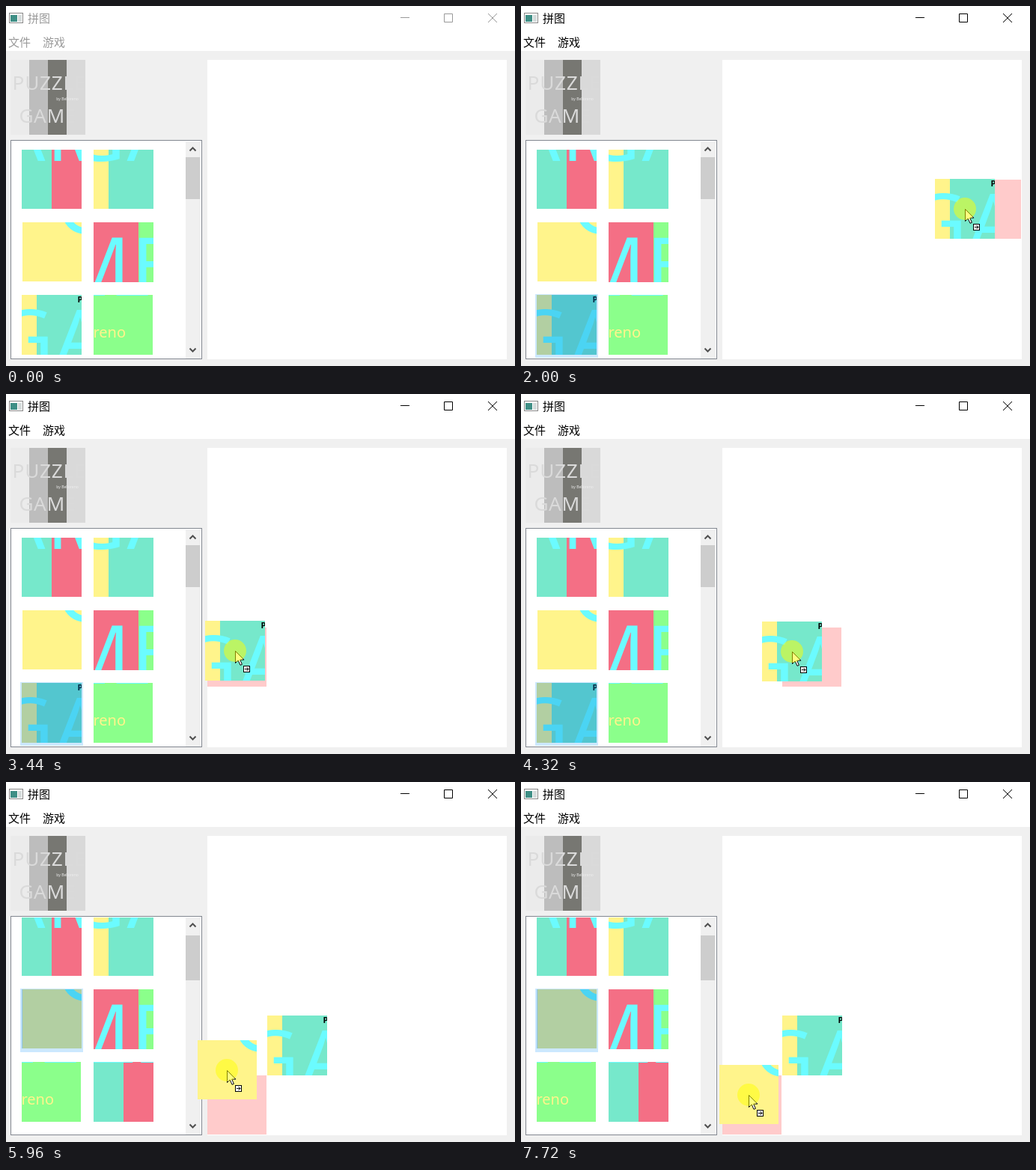
Animation of 680x481 px, one loop 8 s. Source, as an HTML page:

```html
<!DOCTYPE html>
<html lang="zh-CN">
<head>
<meta charset="utf-8">
<title>拼图</title>
<style>
  html, body { margin: 0; width: 100%; height: 100%; overflow: hidden; background: #f0f0f0; }
  #stage { display: block; width: 680px; height: 481px; }
  .art text { font-family: "Noto Sans", "Open Sans", sans-serif; }
  .word { font-size: 105px; fill: var(--word); }
  .full {
    --s0: #fff48b; --s1: #76e8cb; --s2: #f46f85; --s3: #8bff8b;
    --word: #6bfbff; --by: #fff48b; --mark: #000;
  }
  .grey {
    --s0: #ebebeb; --s1: #bdbdbd; --s2: #777772; --s3: #d9d9d9;
    --word: #dadada; --by: #eee; --mark: none;
  }
  #frame { --ink: #999; font: 15px "Noto Sans CJK SC", "Noto Sans CJK", "Noto Sans CJK JP", sans-serif; }
  #frame.active { --ink: #000; }
  #frame text { fill: var(--ink); }
  #frame .button { stroke: var(--ink); fill: none; shape-rendering: geometricPrecision; }
  .back, .tint { visibility: hidden; }
  .back { fill: #cce8ff; stroke: #cce8ff; }
  .tint { fill: rgba(0, 120, 215, .3); }
  .selected .back, .selected .tint, .hover .back { visibility: visible; }
  .hover .back { fill: #e5f3ff; stroke: #e5f3ff; }
  .focus .back { stroke: #99d1ff; }
</style>
</head>
<body>
<svg id="stage" viewBox="0 0 680 481">
  <defs>
    <g id="picture" class="art">
      <path style="fill:var(--s0)" d="M1 0h99v400h-99z"/>
      <path style="fill:var(--s1)" d="M100 0h100v400h-100z"/>
      <path style="fill:var(--s2)" d="M200 0h100v400h-100z"/>
      <path style="fill:var(--s3)" d="M300 0h100v400h-100z"/>
      <text class="word" x="10" y="161" letter-spacing="3">PUZZLE</text>
      <text class="word" x="46" y="335" letter-spacing="2">GAME</text>
      <text x="363" y="217" text-anchor="end" font-size="20" style="fill:var(--by)">by Belloreno</text>
      <text x="154.5" y="249.5" font-size="11" font-weight="700" style="fill:var(--mark)">P</text>
    </g>
    <clipPath id="listClip"><rect x="7" y="181" width="233" height="290"/></clipPath>
  </defs>

  <rect width="680" height="481" fill="#f0f0f0"/>
  <rect width="680" height="60" fill="#fff"/>
  <g id="frame">
    <rect x="4.5" y="9.5" width="18" height="13" fill="#fff" stroke="#888"/>
    <rect x="6" y="12" width="9" height="9" fill="#3f8f86"/>
    <rect x="16" y="12" width="5" height="9" fill="#d5dcdc"/>
    <text x="29" y="22">拼图</text>
    <text x="3" y="54">文件</text>
    <text x="49" y="54">游戏</text>
    <path class="button" d="M527 15.5h12M585.5 10.5h11v11h-11zM644 10l12 12M656 10l-12 12"/>
  </g>

  <svg class="grey" x="6" y="72" width="100" height="100" viewBox="0 0 400 400"><use href="#picture"/></svg>

  <rect x="6.5" y="179.5" width="255" height="292" fill="#fff" stroke="#828790"/>
  <g clip-path="url(#listClip)"><g id="before"></g><g id="after"></g></g>
  <rect id="dot" x="8" y="181" width="1" height="1"/>
  <rect x="240" y="181" width="20" height="290" fill="#f0f0f0"/>
  <rect id="thumb" x="240" width="19" fill="#cdcdcd"/>
  <path d="M245.5 193.5l4-4 4 4M245.5 457.5l4 4 4-4" fill="none" stroke="#505050" stroke-width="2"/>

  <rect x="269" y="72" width="400" height="400" fill="#fff"/>
  <g id="placed"></g>
  <rect id="cell" width="79" height="79" fill="#ffcbcb"/>
  <g id="floatA"></g>
  <g id="floatB"></g>
  <g id="pointer">
    <path d="M.5.5v16l3.7-3.6 2.8 6.4 2.4-1-2.7-6.2h5.2z" fill="#fff" stroke="#000"/>
    <g id="badge">
      <rect x="11.5" y="20.5" width="8" height="8" fill="#fff" stroke="#000"/>
      <path d="M13 24.5h5M15.5 22l2.5 2.5-2.5 2.5" fill="none" stroke="#000"/>
    </g>
    <circle id="halo" r="15" fill="rgba(255,255,0,.5)"/>
  </g>
</svg>
<script>
const LOOP = 8000, STEP = 40, SIZE = 80;
const PRESS_A = 640, DRAG_A = 720, DROP = 4680, PRESS_B = 5520, DRAG_B = 5560;
const $ = id => document.getElementById(id);

function add(parent, name, attrs) {
  const el = document.createElementNS("http://www.w3.org/2000/svg", name);
  for (const key in attrs) el.setAttribute(key, attrs[key]);
  return parent.appendChild(el);
}

// The picture is 399px square, so the last column and row are a pixel short.
const span = i => i === 4 ? SIZE - 1 : SIZE;

function piece(parent, [c, r], x, y) {
  const width = span(c), height = span(r);
  const viewBox = `${c * SIZE} ${r * SIZE} ${width} ${height}`;
  const box = add(parent, "svg", { class: "full", x, y, width, height, viewBox });
  add(box, "use", { href: "#picture" });
}

function fillList(parent, top, pieces) {
  return pieces.map((p, i) => {
    const x = 21 + i % 2 * 96, y = top + (i >> 1) * 97;
    const item = add(parent, "g", {});
    add(item, "rect", { class: "back", x: x - 1.5, y: y - .5, width: 83, height: 84 });
    piece(item, p, x, y);
    add(item, "rect", { class: "tint", x, y, width: span(p[0]), height: span(p[1]) });
    return item;
  });
}

const first = [1, 3], second = [0, 4];
const pieces = [[2, 4], [1, 4], second, [3, 3], first, [4, 2], [2, 2]];
const before = fillList($("before"), 192, pieces.slice(0, 6));
const after = fillList($("after"), 180, pieces.filter(p => p !== first));
piece($("placed"), first, 349, 312);
piece($("floatA"), first, -40, -40);
piece($("floatB"), second, -40, -40);

// Pointer moves: start, end, x, y; it rests in between.
const moves = [
  [0, 0, 158, 436],
  [440, 600, 60, 428], [760, 1120, 136, 382], [1160, 1520, 524, 216],
  [1800, 2000, 593, 271], [2240, 2640, 307, 223], [2640, 2880, 370, 283],
  [3040, 3440, 306, 343], [4120, 4440, 388, 344], [4840, 4920, 266, -8],
  [5080, 5120, 209, 39], [5160, 5440, 60, 318], [5560, 5960, 295, 385],
  [6000, 6160, 365, 410], [6440, 6640, 308, 413], [6760, 6920, 259, 418],
  [7080, 7200, 374, 422], [7600, 7720, 304, 418]
];

function pointAt(t) {
  const i = moves.findLastIndex(m => m[0] <= t);
  const [start, end, x, y] = moves[i];
  if (t >= end) return [x, y];
  const [, , x0, y0] = moves[i - 1];
  const k = (t - start) / (end - start), ease = k * k * (3 - 2 * k);
  return [Math.round(x0 + (x - x0) * ease), Math.round(y0 + (y - y0) * ease)];
}

const show = (id, on) => { $(id).style.display = on ? "" : "none"; };
const move = (id, x, y) => $(id).setAttribute("transform", `translate(${x} ${y})`);
const snap = (v, start) => start + Math.floor((v - start) / SIZE) * SIZE;

function draw(t) {
  const [x, y] = pointAt(t);
  const dropped = t >= DROP;
  const dragA = t >= DRAG_A && !dropped, dragB = t >= DRAG_B;
  const drag = dragA || dragB;

  $("frame").classList.toggle("active", t >= PRESS_A);
  show("before", !dropped);
  show("after", dropped);
  show("placed", dropped);
  $("thumb").setAttribute("y", dropped ? 205 : 202);
  $("thumb").setAttribute("height", dropped ? 60 : 56);

  before[4].classList.toggle("selected", t >= PRESS_A);
  before[5].classList.toggle("hover", t >= 40 && t < 520);
  after[4].setAttribute("class", t < PRESS_B ? "selected focus" : "");
  after[2].classList.toggle("selected", t >= PRESS_B);

  show("dot", drag && x < 240);
  show("cell", drag && x >= 269);
  $("cell").setAttribute("x", snap(x, 269));
  $("cell").setAttribute("y", snap(y + 36, 72));

  show("floatA", dragA);
  show("floatB", dragB);
  show("pointer", t >= 40);
  show("badge", drag);
  show("halo", t >= PRESS_A && !dropped || t >= PRESS_B);
  for (const id of ["floatA", "floatB", "pointer"]) move(id, x, y);
}

function tick() {
  const t = performance.now() % LOOP;
  draw(Math.floor(t / STEP) * STEP);
  requestAnimationFrame(tick);
}
tick();
</script>
</body>
</html>
```
